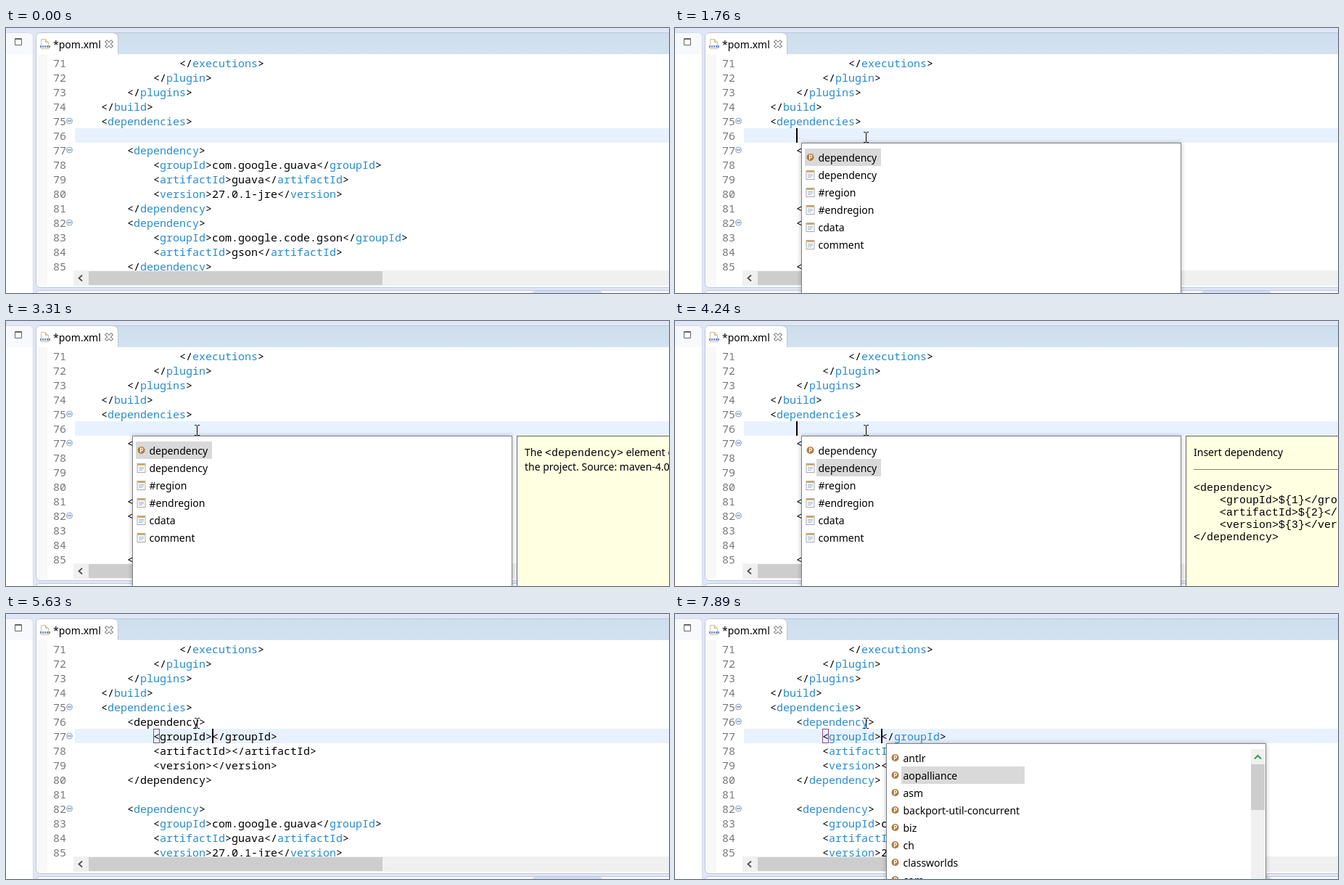
Animation, 914 px wide and 365 px high, one loop 8 s. Source, as an HTML page:

```html
<!DOCTYPE html>
<html lang="en">
<head>
<meta charset="utf-8">
<title>Completing a dependency in pom.xml</title>
<style>
  html, body { margin: 0; width: 100%; height: 100%; overflow: hidden; background: #e1e6f6; }
  svg { display: block; }
  text { white-space: pre; }
  .ui { font: 14px "Noto Sans", "Open Sans", sans-serif; }
  .code { font: 15px "Noto Sans Mono", "DejaVu Sans Mono", monospace; }
  .help { font: 15px "Liberation Mono", monospace; }
  .tag { fill: #268bd2; }
  .num { fill: #787878; }
  .sel { fill: #d9d9d9; }
  .popup { filter: drop-shadow(0 0 3px #0004); }
</style>
</head>
<body>
<svg width="914" height="365" viewBox="0 0 914 365">
  <defs>
    <linearGradient id="strip" x2="0" y2="1">
      <stop stop-color="#cddeec"/><stop offset="1" stop-color="#d3e2f0"/>
    </linearGradient>
    <g id="fold">
      <circle r="4" fill="#eef3fa" stroke="#8ea6c4"/>
      <path d="M-2.5 0h5" stroke="#4a6a94"/>
    </g>
    <g id="property">
      <circle r="5" fill="#b07a3c"/>
      <path d="M-1 3.2v-6h1.4a1.7 1.7 0 0 1 0 3.4h-1.4" fill="none" stroke="#fff" stroke-width="1.2"/>
    </g>
    <g id="template">
      <rect x="-5.5" y="-5.5" width="11" height="12" fill="#fff" stroke="#a3a8b2"/>
      <path d="M-5 -4h10" stroke="#dba850" stroke-width="2"/>
      <path d="M-3.5 -.5h7M-3.5 1.5h7M-3.5 3.5h5" stroke="#9db2d3"/>
    </g>
  </defs>

  <!-- Window frame -->
  <path d="M-1 6.5H30Q37.5 6.5 37.5 14V366H-1z" fill="#fff" stroke="#d3daec"/>
  <path d="M0 7H30Q37 7 37 14V36H0z" fill="#f8f9fd"/>
  <path d="M12.5 14.5h9v9h-9zM12 15.5h10" fill="#fff" stroke="#666"/>
  <path d="M915 6.5H48Q41.5 6.5 41.5 13V351Q41.5 357.5 48 357.5H915z" fill="#fff" stroke="#bcc6dd"/>
  <path d="M147 7H914V36H147z" fill="url(#strip)"/>
  <path d="M42 36V13Q42 7 48 7H147Q154.5 7 154.5 14V36" fill="#fff"/>
  <path d="M147 6.5Q154.5 6.5 154.5 14V36" fill="none" stroke="#bcc6dd"/>
  <path d="M48.5 15.5h6l4 4v9h-10z" fill="#fff" stroke="#c8c0a8"/>
  <path d="M54.5 15.5v4h4" fill="#f3e3b5" stroke="#c9b27c"/>
  <path d="M47 25.5h14" stroke="#7391cb" stroke-width="3" stroke-dasharray="2 1"/>
  <text class="ui" x="65" y="27.5">*pom.xml</text>
  <path d="M137.5 17.5l9 9m0-9l-9 9" stroke="#777" stroke-width="4.5"/>
  <path d="M138.2 18.2l7.600 7.600m0-7.600l-7.600 7.600" stroke="#fff" stroke-width="2.500"/>
  <rect x="43" y="36" width="14" height="319" fill="#f8f8f8"/>
  <path d="M915 361.5H48Q41.5 361.5 41.5 366H915z" fill="#f6f8fd" stroke="#bcc6dd"/>
  <path d="M725 365Q727 362 731 362H816Q821 362 822 365z" fill="#cfdcf2"/>

  <!-- Editor -->
  <rect x="95" y="138" width="819" height="20" fill="#e8f2fe" data-on="0 5630"/>
  <rect x="95" y="158" width="819" height="20" fill="#e8f2fe" data-on="5630"/>
  <g class="code" id="editor"></g>
  <use href="#fold" x="87.5" y="128"/>
  <use href="#fold" x="87.5" y="168" data-on="0 6490"/>
  <use href="#fold" x="87.5" y="148" data-on="6490"/>
  <use href="#fold" x="87.5" y="268"/>
  <rect x="203.5" y="158.5" width="8" height="19" fill="none" stroke="#8a4a8a" data-on="5630"/>
  <rect x="167" y="138" width="2" height="20" data-on="670 1210 1760 2300 2760 3310 3860 4390 4850 5400"/>
  <rect x="284" y="158" width="2" height="20" data-on="5630 6170 6490 7040 7590"/>

  <rect x="58" y="334" width="37" height="22" fill="#fff"/>
  <rect x="93" y="334" width="821" height="21" fill="#f0f0f0"/>
  <rect x="114" y="335" width="405" height="19" fill="#cdcdcd"/>
  <path d="M105 340.5l-4.500 4 4.500 4" fill="none" stroke="#505050" stroke-width="1.8"/>

  <path id="mouse" d="M260 143.5h2.500l1 1 1-1h2.500M263.500 144v13M260 157.500h2.500l1-1 1 1h2.500" fill="none" stroke="#000"/>
  <circle cx="261" cy="150" r="15" fill="#ff0" opacity=".47" data-on="670 830"/>

  <!-- Element completion -->
  <g data-on="1760 5630">
    <rect class="popup" x="174.5" y="158.5" width="523" height="220" fill="#fff" stroke="#828282"/>
    <rect class="sel" x="179" y="166" width="105" height="24" data-on="1760 3690"/>
    <rect class="sel" x="195" y="190" width="89" height="24" data-on="3690"/>
    <g id="elements"></g>
  </g>
  <g data-on="2220 5630">
    <rect x="704.5" y="158.5" width="220" height="220" fill="#ffffe1" stroke="#646464"/>
    <g class="ui" data-on="2220 4240">
      <text x="715" y="185.5">The <tspan class="help">&lt;dependency&gt;</tspan> element contains</text>
      <text x="715" y="206">the project. Source: maven-4.0.0.xsd</text>
    </g>
    <g data-on="4240">
      <text class="ui" x="715" y="185.5">Insert dependency</text>
      <path d="M715 204.5H914" stroke="#808080"/>
      <g class="help" id="snippet"></g>
    </g>
  </g>

  <!-- Group id completion -->
  <g data-on="6870">
    <rect class="popup" x="291.5" y="178.5" width="523" height="220" fill="#fff" stroke="#828282"/>
    <rect class="sel" x="296" y="186" width="186" height="24" data-on="6870 7890"/>
    <rect class="sel" x="312" y="210" width="170" height="24" data-on="7890"/>
    <g id="groups"></g>
    <rect x="794" y="186" width="19" height="180" fill="#f0f0f0"/>
    <rect x="794" y="207" width="19" height="63" fill="#cdcdcd"/>
    <path d="M799 199.5l4.500-4.500 4.500 4.500" fill="none" stroke="#2ea04f" stroke-width="2"/>
  </g>
</svg>
<script>
const $ = id => document.getElementById(id);
const escape = s => s.replace(/</g, '&lt;');
const colour = s => s.replace(/<(\/?)(\w+)>/g, '&lt;$1<tspan class="tag">$2</tspan>&gt;');

// Lines of code on the 9 px grid; leading spaces become the indent.
const block = (lines, x, y, pitch, paint) => lines.map((line, i) => {
  const body = line.trimStart();
  return `<text x="${x + 9 * (line.length - body.length)}" y="${y + i * pitch}">${paint(body)}</text>`;
}).join('');

const code = (first, lines, on = '0', paint = colour) =>
  `<g data-on="${on}">${block(lines, 95, 54 + 20 * (first - 71), 20, paint)}</g>`;

const list = (names, x, y, icon) => names.map((name, i) =>
  `<use href="#${icon(i)}" x="${x}" y="${y + 24 * i}"/>
   <text class="ui" x="${x + 11}" y="${y + 6 + 24 * i}">${name}</text>`).join('');

const head = [
  '                </executions>',
  '            </plugin>',
  '        </plugins>',
  '    </build>',
  '    <dependencies>'];
const guava = [
  '        <dependency>',
  '            <groupId>com.google.guava</groupId>',
  '            <artifactId>guava</artifactId>',
  '            <version>27.0.1-jre</version>'];
const gson = [
  '        </dependency>',
  '        <dependency>',
  '            <groupId>com.google.code.gson</groupId>',
  '            <artifactId>gson</artifactId>',
  '        </dependency>'];
const fields = ['groupId', 'artifactId', 'version'];
const entry = (indent, value) => [
  '<dependency>',
  ...fields.map((f, i) => `    <${f}>${value(i)}</${f}>`),
  '</dependency>'].map(line => ' '.repeat(indent) + line);
const added = entry(8, () => '');

const numbers = Array.from({ length: 15 }, (_, i) =>
  `<text class="num" x="65" y="${54 + 20 * i}">${71 + i}</text>`).join('');

$('editor').innerHTML = numbers + code(71, head) +
  code(77, [...guava, ...gson], '0 5630') +
  code(76, added, '5630 5710', escape) +
  code(76, added, '5710') +
  code(82, guava, '5630');
$('snippet').innerHTML = block(entry(0, i => '${' + (i + 1) + '}'), 715, 234, 17, escape);
$('elements').innerHTML = list(
  ['dependency', 'dependency', '#region', '#endregion', 'cdata', 'comment'],
  186.5, 178, i => i ? 'template' : 'property');
$('groups').innerHTML = list(
  ['antlr', 'aopalliance', 'asm', 'backport-util-concurrent', 'biz', 'ch', 'classworlds', 'com'],
  303.5, 198, () => 'property');

// data-on lists the times at which a part is switched on, off, on, ...
const parts = [...document.querySelectorAll('[data-on]')].map(el =>
  ({ el, times: el.dataset.on.split(' ').map(Number) }));

function draw(t) {
  for (const { el, times } of parts) {
    const visible = times.filter(time => time <= t).length % 2;
    el.style.display = visible ? '' : 'none';
  }
  const step = Math.min(5, Math.floor((t - 150) / 74));
  const left = (1 - step / 5) ** 2;
  $('mouse').style.display = t < 150 ? 'none' : '';
  $('mouse').setAttribute('transform', `translate(${Math.round(93 * left)} ${Math.round(39 * left)})`);
}

const start = performance.now();
function tick() {
  draw((performance.now() - start) % 8000);
  requestAnimationFrame(tick);
}
tick();
</script>
</body>
</html>
```
